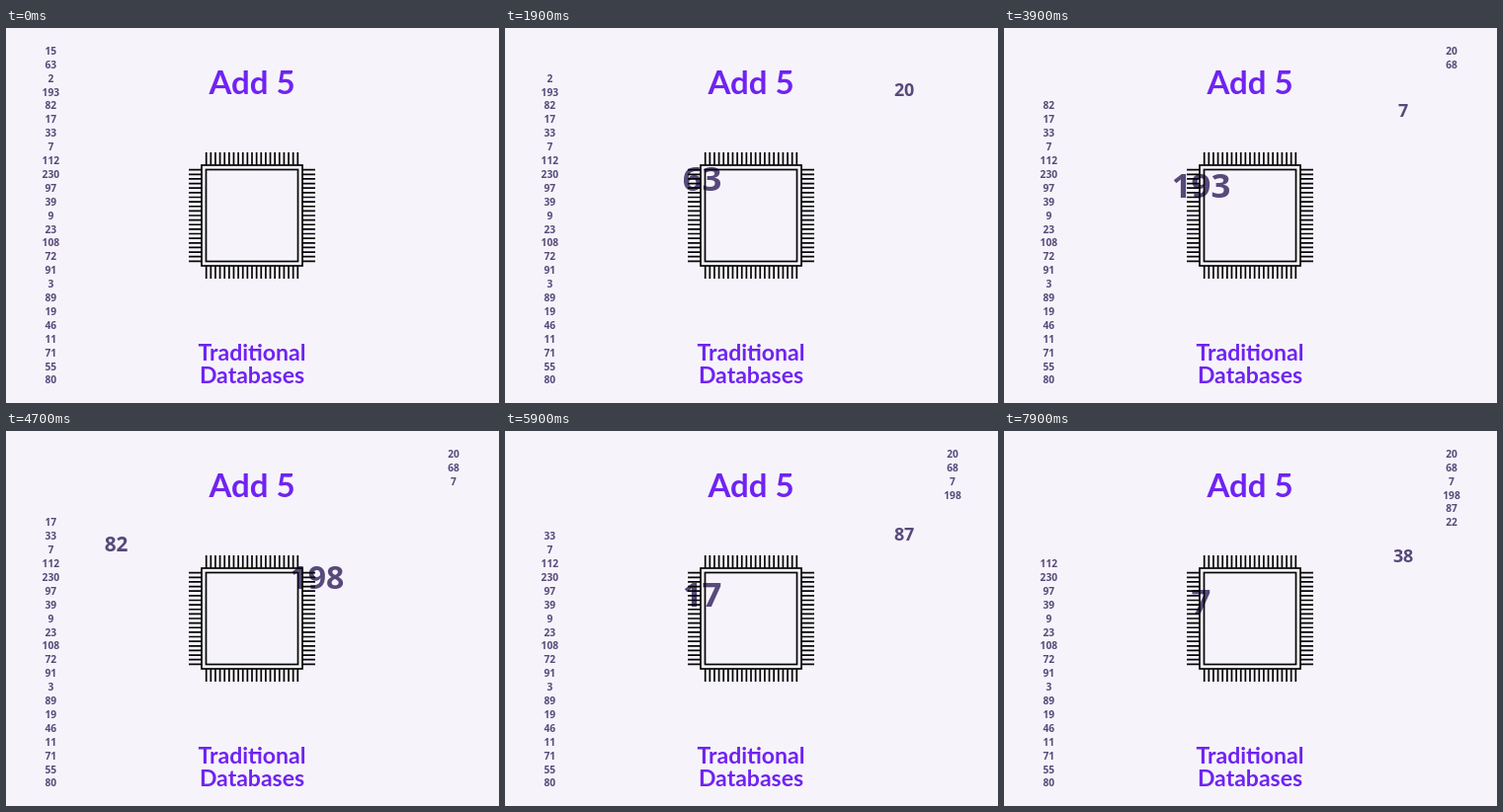
Recreate the animation shown at these times as an HTML page with a canvas. Size 499 by 380 pixels, loop 8 s.

```html
<!DOCTYPE html>
<html lang="en">
<head>
<meta charset="utf-8">
<title>Add 5</title>
<style>
  html, body { margin: 0; overflow: hidden; background: #f6f4fa; }
  canvas { display: block; }
</style>
</head>
<body>
<canvas id="stage" width="499" height="380"></canvas>
<script>
const ctx = document.getElementById('stage').getContext('2d');
const VALUES = [15, 63, 2, 193, 82, 17, 33, 7, 112, 230, 97, 39, 9,
                23, 108, 72, 91, 3, 89, 19, 46, 11, 71, 55, 80];
const LOOP = 8000, BEAT = 1000;
const PURPLE = '#7023f2', INK = '#57497a';

const inputSlot = i => ({ x: 45.3, y: 23.2 + 13.9 * i, size: 10.2 });
const outputSlot = i => ({ ...inputSlot(i), x: 453 });
const CORE = { x: 247.8, y: 188.8, size: 42.5 };

function mix(a, b, p) {
  const at = key => a[key] + (b[key] - a[key]) * p;
  return { x: at('x'), y: at('y'), size: at('size') };
}

function drawNumber(value, { x, y, size }) {
  ctx.font = `700 ${size}px "Open Sans", "Noto Sans", sans-serif`;
  ctx.fillStyle = INK;
  ctx.fillText(value, x, y + size * 0.357);
}

function drawTitle(text, size, baseline) {
  ctx.font = `700 ${size}px Lato, sans-serif`;
  ctx.fillStyle = PURPLE;
  ctx.fillText(text, 249, baseline);
  const at = text.indexOf('ti');
  if (at < 0) return;
  // joined crossbar of the "ti" pair
  const left = 249 - ctx.measureText(text).width / 2 + ctx.measureText(text.slice(0, at)).width;
  ctx.fillRect(left + size * 0.2, baseline - size * 0.515, size * 0.26, size * 0.1);
}

function drawChip() {
  ctx.save();
  ctx.translate(249, 190);
  ctx.strokeStyle = '#050505';
  ctx.lineWidth = 1.7;
  for (const half of [51, 46.5]) ctx.strokeRect(-half, -half, half * 2, half * 2);
  ctx.beginPath();
  for (let side = 0; side < 4; side++) {
    for (let k = -10; k <= 10; k++) {
      ctx.moveTo(k * 4.63, -64);
      ctx.lineTo(k * 4.63, -51);
    }
    ctx.rotate(Math.PI / 2);
  }
  ctx.stroke();
  ctx.restore();
}

// Each number enters during the second half of its beat, rests, then leaves as value + 5.
function drawItem(value, i, beats) {
  const age = beats - i;
  const travel = start => Math.min(1, Math.max(0, (age - start) * 2)) ** 1.22;
  if (age < 1.5) drawNumber(value, mix(inputSlot(i), CORE, travel(0.5)));
  else drawNumber(value + 5, mix(CORE, outputSlot(i), travel(1.5)));
}

function render(now) {
  const beats = now % LOOP / BEAT;
  ctx.fillStyle = '#f6f4fa';
  ctx.fillRect(0, 0, 499, 380);
  ctx.textAlign = 'center';
  drawTitle('Add 5', 33, 66.5);
  drawTitle('Traditional', 23, 337);
  drawTitle('Databases', 23, 360);
  VALUES.forEach((value, i) => drawItem(value, i, beats));
  drawChip();
}

let start;
function tick(now) {
  start ??= now;
  render(now - start);
  requestAnimationFrame(tick);
}
requestAnimationFrame(tick);
</script>
</body>
</html>
```
